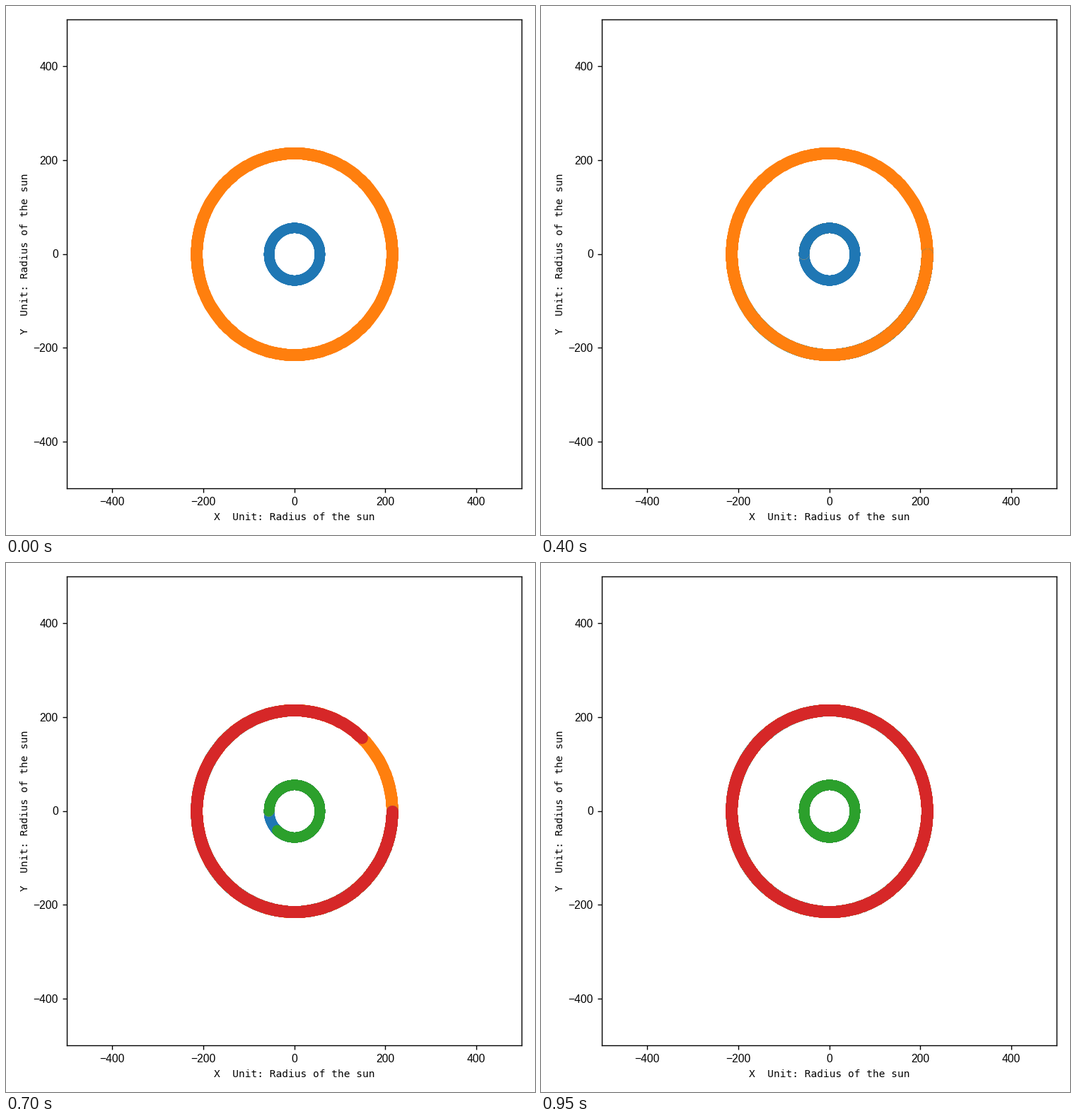
Recreate the animation shown at these times as a matplotlib script. Size 748 px wide and 748 px high, loop 1000 ms.

```python
import numpy as np
import matplotlib.pyplot as plt
from matplotlib.animation import FuncAnimation

SIZE, DPI = 748, 125
FRAMES, INTERVAL = 20, 50
LEFT, RIGHT, TOP, BOTTOM = 86, 729, 19, 682
# radius, starting angle in degrees, marker area
ORBITS = [(56, 180, 50), (215, 0, 75)]

fig = plt.figure(figsize=(SIZE / DPI, SIZE / DPI), dpi=DPI, facecolor="white")
ax = fig.add_axes([LEFT / SIZE, 1 - BOTTOM / SIZE,
                   (RIGHT - LEFT) / SIZE, (BOTTOM - TOP) / SIZE])
ax.set(xlim=(-500, 500), ylim=(-500, 500))
ticks = range(-400, 401, 200)
ax.set_xticks(ticks)
ax.set_yticks(ticks)
for label in ax.get_xticklabels() + ax.get_yticklabels():
    label.set(family="Liberation Sans", size=9)


def axis_title(x, y, text, rotation=0):
    fig.text(x / SIZE, 1 - y / SIZE, text, family="DejaVu Sans Mono", size=8.35,
             ha="center", va="baseline", rotation=rotation, rotation_mode="anchor")


axis_title(407.5, 727, "X  Unit: Radius of the sun")
axis_title(31, 350.5, "Y  Unit: Radius of the sun", 90)


def swept_angle(n):
    """Degrees travelled after n steps; the bodies slow down near the end."""
    return min(360, n * (23.62 - 0.034 * (n - 8) ** 2))


def draw_arcs(sweep, pair):
    """Draw both clockwise trails in one pair of cycle colours."""
    angles = np.linspace(0, sweep, int(sweep * 2) + 1) if sweep else np.empty(0)
    arcs = []
    for i, (radius, start, area) in enumerate(ORBITS):
        phi = np.radians(start - angles)
        arcs.append(ax.scatter(radius * np.cos(phi), radius * np.sin(phi),
                               s=area, color=f"C{2 * pair + i}"))
    return arcs


draw_arcs(360, 0)
trails = [draw_arcs(swept_angle(n), (n + 2) % 5) for n in range(FRAMES)]


def update(n):
    for i, arcs in enumerate(trails):
        for arc in arcs:
            arc.set_visible(i <= n)
    return [arc for arcs in trails for arc in arcs]


anim = FuncAnimation(fig, update, frames=FRAMES, interval=INTERVAL,
                     repeat=True, repeat_delay=0)
plt.show()
```
